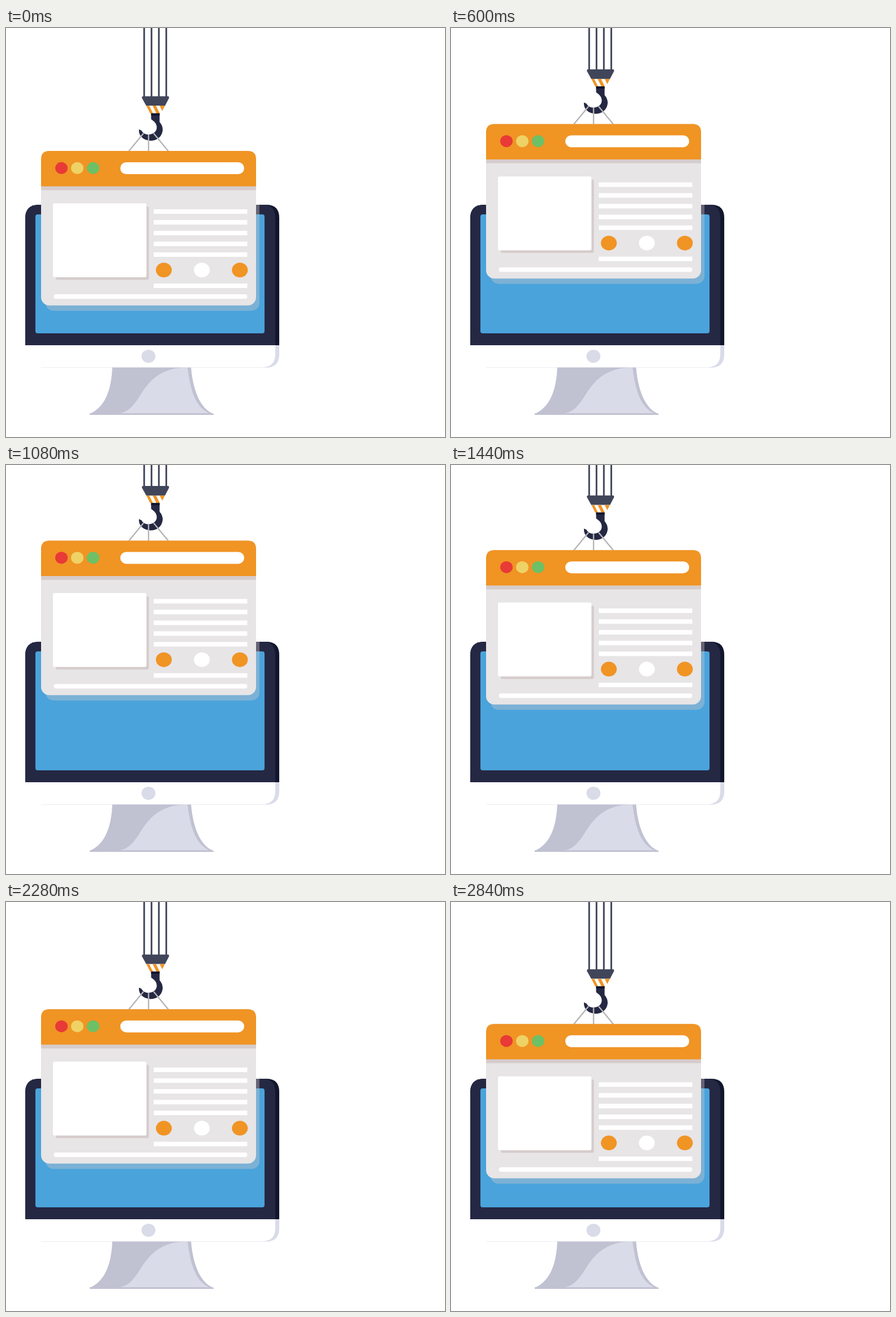
Animation, 776 px wide and 722 px high, one loop 2880 ms. Source, as an HTML page:

```html
<!DOCTYPE html>
<html lang="en">
<head>
<meta charset="utf-8">
<title>Crane lowering a web page</title>
<style>
  html, body { margin: 0; width: 100%; height: 100%; overflow: hidden; background: #fff; }
  svg { display: block; width: 100%; height: 100%; }
</style>
</head>
<body>
<svg viewBox="0 0 776 722">
  <defs>
    <path id="case" d="M34 560V336Q34 312 58 312H460Q483 312 483 335V560Z"/>
    <clipPath id="caseClip"><use href="#case"/></clipPath>
    <clipPath id="stripeClip"><path d="M248 137H281L274 151H255Z"/></clipPath>
  </defs>

  <!-- stand -->
  <path fill="#d9dbe8" d="M188 599H327C331 648 348 675 367 681V683H148V681C170 672 186 648 188 599Z"/>
  <g fill="#c0c2d2">
    <path d="M188 599H321C280 600 259 615 240 644C228 663 217 680 198 680V683H148V681C170 672 186 648 188 599Z"/>
    <path d="M321 599H327C331 648 348 675 367 681V683H148V680H359C338 671 326 645 321 599Z"/>
  </g>

  <!-- monitor -->
  <use href="#case" fill="#12162d"/>
  <path fill="#252843" d="M34 560V336Q34 312 58 312H456Q476 313 476 335V560Z"/>
  <path fill="#d9dbe8" d="M62 560H483V576Q483 599.6 459 599.6H62Z"/>
  <path fill="#fff" d="M34 560H476V576Q476 599 452 599H34Z"/>
  <rect x="52" y="329" width="405" height="210" rx="4" fill="#4aa3db"/>
  <ellipse cx="251.8" cy="579.5" rx="12.3" ry="11.5" fill="#d9dbe8"/>

  <g clip-path="url(#caseClip)">
    <rect class="load" x="70" y="226" width="378" height="273.2" rx="14" fill="#d5cbcb" opacity=".36"/>
  </g>

  <g class="load">
    <!-- crane -->
    <path d="M244.2-140V122M257.2-140V122M270.2-140V122M283.3-140V122" stroke="#3d4156" stroke-width="2.9"/>
    <path fill="#41455a" d="M242 120.6H286.5Q289 121 288 124L281 137.5H248L240.5 124Q239.5 121 242 120.6Z"/>
    <g clip-path="url(#stripeClip)">
      <path fill="#fff" d="M240 137h50v14h-50z"/>
      <path fill="#f09424" d="M247 137h6l7 14h-6zM259 137h6l7 14h-6zM271.5 137h10l4 14h-7z"/>
    </g>
    <path fill="#252843" d="M256.5 151H271.5V166Q277 172 277 180C276 192 267 199 255 199C243 198 234 191 235 179L239.500 181C242 186 247 188.500 253 188C261 187 266.500 183 266.500 175C266 168 262 165 256.500 161Z"/>
    <path fill="#10142a" d="M256.500 150.500h15v4h-15z"/>
    <path d="M243 186L217 217.500M252 188V218M261 186L287 217.500" stroke="#b5b5b6" stroke-width="2.4"/>

    <!-- browser window -->
    <rect x="62" y="217" width="380" height="272.700" rx="14.500" fill="#e7e5e6"/>
    <path fill="#d6cccc" d="M62 279h380v7.300H62z"/>
    <path fill="#f09424" d="M62 279.600V231.500Q62 217 76.500 217H427.500Q442 217 442 231.500V279.600Z"/>
    <g id="dots"></g>
    <rect x="88" y="315" width="164.600" height="129.500" rx="3" fill="#d6cccc"/>
    <g fill="#fff">
      <rect x="202" y="237" width="219" height="21" rx="10.500"/>
      <rect x="83" y="309.500" width="165.300" height="130.500" rx="3"/>
      <path id="textLines"/>
      <rect x="84.500" y="470" width="342" height="8" rx="4"/>
    </g>
  </g>
</svg>
<script>
const LOOP = 2880, STEP = 40;

const dot = (x, y, rx, ry, color) =>
  `<ellipse cx="${x}" cy="${y}" rx="${rx}" ry="${ry}" fill="${color}"/>`;
document.getElementById('dots').innerHTML =
  ['#e83a36', '#eed265', '#6dc065'].map((c, i) => dot(98 + 28 * i, 247.3, 11, 10.5, c)).join('') +
  ['#f09424', '#fff', '#f09424'].map((c, i) => dot(279 + 67.2 * i, 427.2, 14, 13, c)).join('');

document.getElementById('textLines').setAttribute('d',
  [320, 339, 358, 377, 396, 451].map(y => `M261 ${y}h165.5v8H261z`).join(''));

// Slow constant descent; the upward pull starts with a hard jump at 560 ms.
const DROP = 26 / 560, PULL = 11.15 / STEP, PULL_START = 560;
function height(t) {
  if (t < PULL_START) return t * DROP;
  return Math.max((t - LOOP) * DROP, -36.4 - (t - PULL_START) * PULL);
}

const loads = document.querySelectorAll('.load');
function draw(now) {
  const t = Math.floor((now % LOOP) / STEP) * STEP;
  for (const part of loads) part.setAttribute('transform', `translate(0 ${height(t).toFixed(2)})`);
  requestAnimationFrame(draw);
}
draw(performance.now());
</script>
</body>
</html>
```
